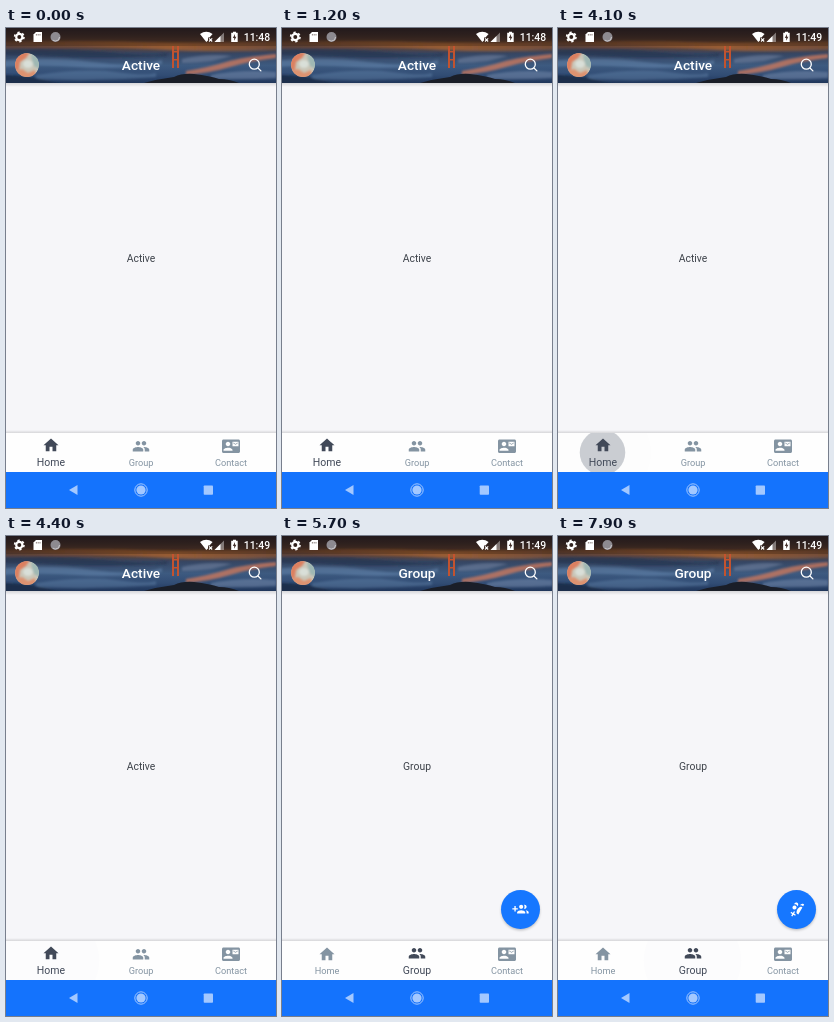
These frames come from a looping animation (270x480 px, 8 s). An HTML page:

```html
<!DOCTYPE html>
<html lang="en">
<head>
<meta charset="utf-8">
<title>Tabs</title>
<style>
html, body { margin: 0; width: 100%; height: 100%; overflow: hidden; background: #f6f6f9; }
svg { display: block; width: 100%; height: 100%; font-family: Roboto, sans-serif; }
text { text-anchor: middle; }
</style>
</head>
<body>
<svg viewBox="0 0 270 480">
  <defs>
    <linearGradient id="sky" x2="0" y2="1">
      <stop offset="0" stop-color="#2b2023"/>
      <stop offset=".14" stop-color="#3a2925"/>
      <stop offset=".27" stop-color="#51362b"/>
      <stop offset=".36" stop-color="#544140"/>
      <stop offset=".47" stop-color="#364663"/>
      <stop offset=".68" stop-color="#3d5a80"/>
      <stop offset=".86" stop-color="#314c74"/>
      <stop offset="1" stop-color="#20365a"/>
    </linearGradient>
    <linearGradient id="glow">
      <stop offset="0" stop-color="#d9782a" stop-opacity=".1"/>
      <stop offset=".6" stop-color="#d9782a" stop-opacity=".5"/>
      <stop offset="1" stop-color="#d9782a" stop-opacity=".2"/>
    </linearGradient>
    <linearGradient id="shade" x2="0" y2="1">
      <stop offset="0" stop-color="#000" stop-opacity=".13"/>
      <stop offset="1" stop-color="#000" stop-opacity="0"/>
    </linearGradient>
    <clipPath id="head"><path d="M0 0h270v55H0z"/></clipPath>
    <clipPath id="bar"><path d="M0 405h270v39H0z"/></clipPath>
    <clipPath id="face"><circle cx="21" cy="37" r="12"/></clipPath>
    <filter id="soft" x="-20%" y="-50%" width="140%" height="200%"><feGaussianBlur stdDeviation="1.3"/></filter>
    <filter id="drop" x="-30%" y="-30%" width="160%" height="160%"><feGaussianBlur stdDeviation="1.6"/></filter>
  </defs>

  <path d="M0 0h270v480H0z" fill="#f6f6f9"/>
  <path d="M0 55h270v4H0z" fill="url(#shade)"/>

  <g clip-path="url(#head)">
    <path d="M0 0h270v55H0z" fill="url(#sky)"/>
    <g filter="url(#soft)">
      <path d="M-9 14q90-2 140 0t150-1v8q-60 4-120 1T-9 18z" fill="url(#glow)"/>
      <path d="M-9 22q60-3 110 2t60 1v3q-70 3-100 1T-9 27z" fill="#263650" opacity=".7"/>
      <path d="M-9 33q50-5 95 1t70-2v4q-50 6-85 3T-9 39z" fill="#6d8fb5" opacity=".45"/>
      <path d="M30 47q50-7 80-3t40 1v4q-60 5-120 2z" fill="#6a8ab0" opacity=".4"/>
      <path d="M180 43q24-4 40-9t50-8v4q-26 3-46 9t-44 8z" fill="#d27a5c" opacity=".75"/>
      <path d="M176 31q26-6 50-3l-20 5q-16 2-30 2z" fill="#6f7f9d" opacity=".6"/>
      <path d="M205 47q30-6 65-3v6q-30 2-65 1z" fill="#7b8fb0" opacity=".5"/>
      <path d="M-5 47q28-1 62 10H-5z" fill="#1a2d4c"/>
    </g>
    <path d="M166 18h2v22h-2zM171 18h2v22h-2zM166 23h7v1.500h-7zM166 31h7v1.500h-7z" fill="#c2532f"/>
    <path d="M138 55q14-4 30-6 8-4 20-3 16 2 25 5 10 0 20 4z" fill="#1a1e28"/>
    <path d="M0 0h270v18H0z" opacity=".2"/>
  </g>

  <g fill="#fff">
    <circle cx="13.3" cy="9" r="3.1" fill="none" stroke="#fff" stroke-width="2.2"/>
    <circle cx="13.3" cy="9" r="4.7" fill="none" stroke="#fff" stroke-width="1.6" stroke-dasharray="2.3 2.62"/>
    <path d="M30 4h6v10h-8.500V6.500z"/>
    <path d="M30.400 6v1.500M32.200 6v1.500M34 6v1.500" stroke="#43302b" stroke-width=".6"/>
    <circle cx="49.500" cy="9" r="5" fill="#8d8a90"/>
    <circle cx="49.500" cy="9" r="4" fill="none" stroke="#c9c7ca" stroke-width="1" stroke-dasharray="9 17"/>
    <path d="M194 6q6.300-4.500 12.600 0L203.500 9.500h-1.500v3L200.300 14z"/>
    <path d="M203 10.300l3.200 3.200M206.200 10.300l-3.200 3.200" stroke="#fff" stroke-width="1.100"/>
    <path d="M208.500 14H218V4.500z" opacity=".4"/>
    <path d="M208.500 14H214.500V8z"/>
    <path d="M227 3.700h3v1.100h1.700V14h-6.500V4.800H227z"/>
    <path d="M229 6l-2.200 4h1.400v2.800l2.200-4H229z" fill="#43302b"/>
    <text id="clock" x="251" y="13" font-size="10.400" font-weight="500"></text>
  </g>

  <g clip-path="url(#face)">
    <circle cx="21" cy="37" r="12" fill="#c9c6b8"/>
    <g filter="url(#soft)">
      <path d="M8 24h16l-4 6-6 4-1 8H8z" fill="#dc8060"/>
      <path d="M25 25l9 6v10l-6-3-2-6z" fill="#9fb8b4"/>
      <path d="M9 43l7-2 6 4 7-3 2 9H9z" fill="#dd9270"/>
      <ellipse cx="22" cy="36" rx="5" ry="4" fill="#d9dfd8"/>
    </g>
  </g>
  <g fill="none" stroke="#fff" stroke-width="1.300" stroke-linecap="round">
    <circle cx="248.300" cy="36.200" r="5"/><path d="M252.200 40.200l2.700 2.700"/>
  </g>
  <text id="title" x="135" y="42" font-size="13.700" font-weight="500" fill="#fff"></text>
  <text id="body" x="135" y="234" font-size="10.400" fill="#3d424a"></text>

  <g id="fab">
    <circle cy="1.500" r="19" opacity=".28" filter="url(#drop)"/>
    <circle r="19.500" fill="#1677ff"/>
    <g id="addGroup" fill="#fff"><path transform="scale(.68) translate(-12 -12)" d="M8 10H5V7H3v3H0v2h3v3h2v-3h3v-2zm10 1c1.660 0 2.990-1.340 2.990-3S19.660 5 18 5c-.320 0-.630.050-.910.140.570.810.900 1.790.900 2.860s-.340 2.040-.900 2.860c.280.090.590.140.910.140zm-5 0c1.660 0 2.990-1.340 2.990-3S14.660 5 13 5c-1.660 0-3 1.340-3 3s1.340 3 3 3zm6.620 2.160c.830.730 1.380 1.660 1.380 2.840v2h3v-2c0-1.540-2.370-2.490-4.380-2.840zM13 13c-2 0-6 1-6 3v2h12v-2c0-2-4-3-6-3z"/></g>
    <g id="addPerson" fill="#fff"><path transform="scale(.68) translate(-12 -12)" d="M15 12c2.210 0 4-1.790 4-4s-1.790-4-4-4-4 1.790-4 4 1.790 4 4 4zm-9-2V7H4v3H1v2h3v3h2v-3h3v-2H6zm9 4c-2.670 0-8 1.340-8 4v2h16v-2c0-2.660-5.330-4-8-4z"/></g>
  </g>

  <path d="M0 402h270v3H0z" fill="url(#shade)" transform="matrix(1 0 0 -1 0 807)"/>
  <path d="M0 405h270v39H0z" fill="#fefefe"/>
  <g clip-path="url(#bar)" fill="#3f4b5f">
    <circle id="halo" cy="424.500" r="49"/>
    <circle id="ripple" cy="424.500"/>
  </g>
  <g id="tabs"></g>

  <path d="M0 444h270v36H0z" fill="#1473fd"/>
  <g fill="#a3c8ff">
    <path d="M63 462l8.500-5v10z"/>
    <circle cx="135" cy="462" r="4.600"/>
    <circle cx="135" cy="462" r="6.200" fill="none" stroke="#a3c8ff"/>
    <rect x="197.700" y="457.500" width="9.300" height="9.300" rx=".8"/>
  </g>
</svg>
<script>
const LOOP = 8000;
const $ = id => document.getElementById(id);
const clamp = v => Math.max(0, Math.min(1, v));
const span = (t, from, to) => clamp((t - from) / (to - from));
const set = (el, attrs) => { for (const k in attrs) el.setAttribute(k, attrs[k]); };

const tabs = [
  { label: 'Home', page: 'Active', x: 45, icon: 'M10 20v-6h4v6h5v-8h3L12 3 2 12h3v8z' },
  { label: 'Group', page: 'Group', x: 135, icon: 'M16 11c1.66 0 2.99-1.34 2.99-3S17.66 5 16 5c-1.66 0-3 1.34-3 3s1.34 3 3 3zm-8 0c1.66 0 2.99-1.34 2.99-3S9.66 5 8 5C6.34 5 5 6.34 5 8s1.34 3 3 3zm0 2c-2.33 0-7 1.17-7 3.5V19h14v-2.500c0-2.330-4.670-3.500-7-3.500zm8 0c-.29 0-.62.02-.97.05 1.16.84 1.97 1.97 1.97 3.45V19h6v-2.500c0-2.330-4.670-3.500-7-3.500z' },
  { label: 'Contact', page: 'Contact', x: 225, icon: 'M21 8V7l-3 2-3-2v1l3 2 3-2zm1-5H2C.9 3 0 3.900 0 5v14c0 1.100.9 2 2 2h20c1.100 0 1.990-.9 1.990-2L24 5c0-1.100-.9-2-2-2zM8 6c1.660 0 3 1.340 3 3s-1.340 3-3 3-3-1.340-3-3 1.340-3 3-3zm6 12H2v-1c0-2 4-3.100 6-3.100s6 1.100 6 3.100v1zm8-6h-8V6h8v6z' }
];

// lead: how far the ripple has run when it first shows
const taps = [
  { at: 4100, tab: 0, lead: 66 },
  { at: 5300, tab: 1, lead: 126 },
  { at: 6600, tab: 2, lead: 66 },
  { at: 7600, tab: 1, lead: 66 }
];

for (const tab of tabs) {
  const make = name => $('tabs').appendChild(document.createElementNS('http://www.w3.org/2000/svg', name));
  tab.path = make('path');
  tab.path.setAttribute('d', tab.icon);
  tab.text = make('text');
  tab.text.textContent = tab.label;
  set(tab.text, { x: tab.x, y: 438 });
}

function drawTabs(active) {
  tabs.forEach((tab, i) => {
    const on = i === active;
    const fill = on ? '#414958' : '#8494a2';
    set(tab.path, { fill, transform: `translate(${tab.x} ${on ? 417.3 : 418.3}) scale(.75) translate(-12 -12)` });
    set(tab.text, { fill, 'font-size': on ? 10.5 : 9.2 });
  });
  $('title').textContent = $('body').textContent = tabs[active].page;
}

function drawRipple(t, tap) {
  const age = tap ? t - tap.at + tap.lead : 1e4;
  const cx = tap ? tabs[tap.tab].x - .5 : 0;
  const grow = 1 - (1 - clamp(age / 250)) ** 2;
  set($('ripple'), { cx, r: 49 * grow, opacity: .27 * (1 - span(age, 150, 250)) });
  set($('halo'), { cx, opacity: .085 * span(age, 60, 190) * (1 - span(age, 265, 375)) });
}

function drawFab(t) {
  const scale = 1 - (1 - span(t, 5340, 5680)) ** 3;
  set($('fab'), { transform: `translate(238.5 373.5) scale(${scale})`, opacity: scale ? 1 : 0 });
  const toPerson = span(t, 6650, 6850);
  const toGroup = span(t, 7700, 8000);
  const person = clamp(toPerson * 1.5) - clamp(toGroup * 1.5);
  const groupTurn = t < 7600 ? -90 * toPerson : -180 * (1 - toGroup);
  const personTurn = 180 * (1 - toPerson) + 90 * toGroup;
  set($('addPerson'), { opacity: person, transform: `rotate(${personTurn})` });
  set($('addGroup'), { opacity: 1 - person, transform: `rotate(${groupTurn})` });
}

function draw(t) {
  const tap = taps.filter(p => t >= p.at).pop();
  $('clock').textContent = t < 1500 ? '11:48' : '11:49';
  drawTabs(tap ? tap.tab : 0);
  drawRipple(t, tap);
  drawFab(t);
}

const start = performance.now();
function tick(now) {
  draw(Math.max(0, now - start) % LOOP);
  requestAnimationFrame(tick);
}
draw(0);
requestAnimationFrame(tick);
</script>
</body>
</html>
```
